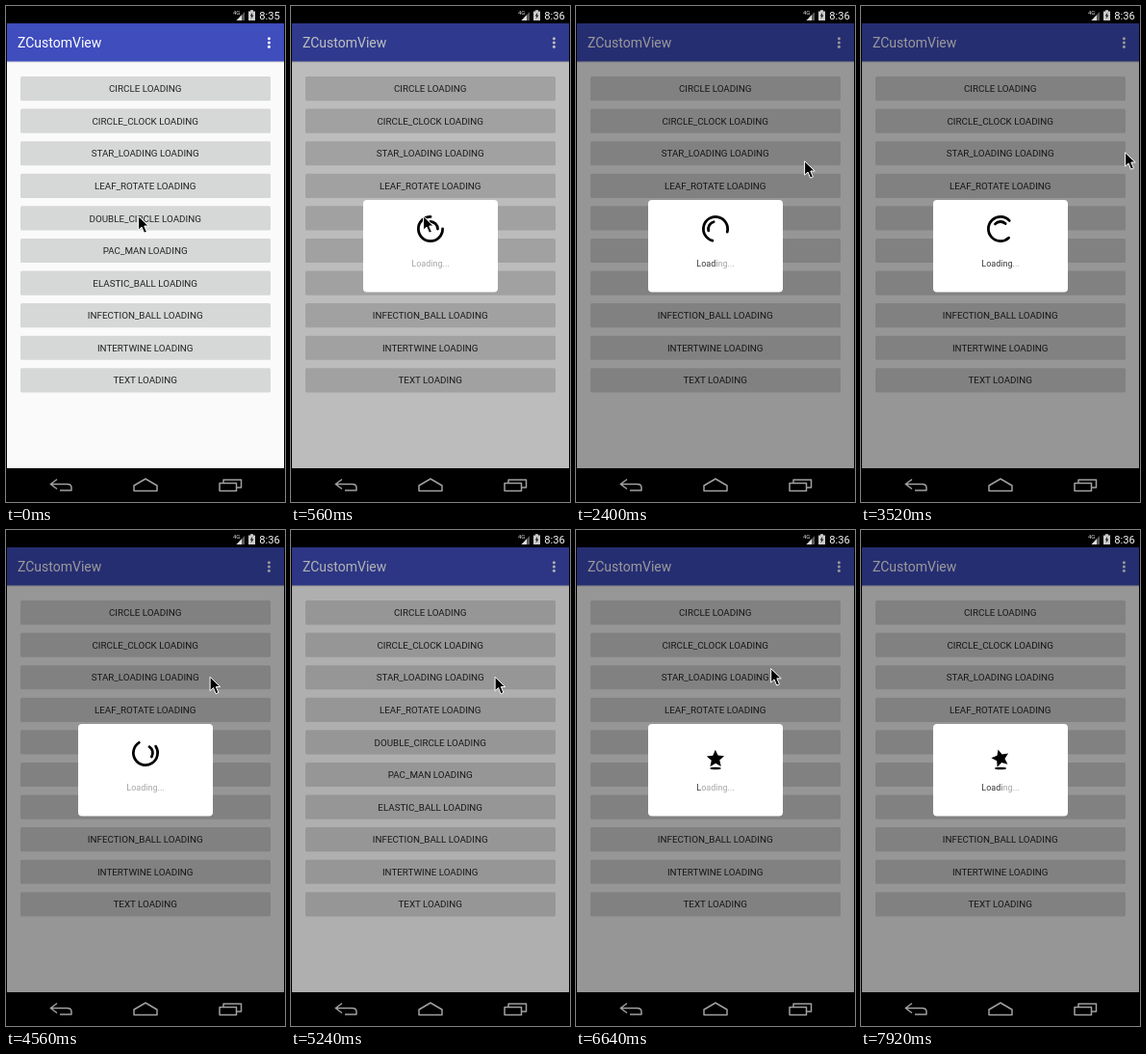
Recreate the animation shown at these times as an HTML page. Size 290 px wide and 514 px high, loop 8000 ms.

```html
<!DOCTYPE html>
<html lang="en">
<head>
<meta charset="utf-8">
<title>Loading dialogs</title>
<style>
  html, body { margin: 0; width: 100%; height: 100%; overflow: hidden; background: #000; }
  svg { display: block; width: 290px; height: 514px; }
  text { font-family: Roboto, "Noto Sans", sans-serif; }
  .label { font-size: 9.8px; fill: #222; text-anchor: middle; }
  .nav { fill: none; stroke: #a0a0a0; stroke-width: 1.5; stroke-linejoin: round; }
  .ring { fill: none; stroke: #000; stroke-width: 2.8; stroke-linecap: round; }
</style>
</head>
<body>
<svg viewBox="0 0 290 514">
  <rect width="290" height="514"/>
  <rect x="1" y="18" width="288" height="461" fill="#fafafa"/>
  <rect x="1" y="18" width="288" height="39.5" fill="#3f4dbd"/>
  <rect x="1" y="57.5" width="288" height="1" opacity=".13"/>
  <text x="12" y="43" font-size="14" fill="#fff">ZCustomView</text>
  <g fill="#fff">
    <circle cx="273.4" cy="33.8" r="1.5"/>
    <circle cx="273.4" cy="38" r="1.5"/>
    <circle cx="273.4" cy="42.2" r="1.5"/>
  </g>
  <g id="buttons"></g>

  <text x="236" y="9" font-size="6" fill="#ddd">4G</text>
  <path d="M239.5 15H248V6Z" fill="#5a5a5a"/>
  <path d="M239.5 15H245V9.2Z" fill="#ddd"/>
  <path d="M252 5.5h2v-1.3h3v1.3h2V15h-7Z" fill="#ccc"/>
  <path d="M256.3 6.5L253.7 10.4H255.2L254.6 13.6L257.5 9.5H255.8Z" fill="#222"/>
  <text id="clock" x="263.3" y="14" font-size="11.2" fill="#f4f4f4"></text>

  <path class="nav" d="M53 490.5L46.3 495.5L53 500.5M46.5 495.5H63.5Q68 495.5 68 499V502H56"/>
  <path class="nav" d="M145 490L133 497V502.5H157V497Z"/>
  <path class="nav" d="M222 494.5H239.5V502.5H222ZM226 494V491H244.5V499H240"/>

  <rect id="dim" x="1" y="18" width="288" height="461"/>
  <g id="dialog">
    <rect x="75" y="201" width="140" height="95.5" rx="4" fill="#fff"/>
    <g id="rings">
      <path id="outer" class="ring"/>
      <path id="inner" class="ring"/>
    </g>
    <g id="jump">
      <ellipse id="shadow" cx="145" cy="247" ry="1.3"/>
      <path id="star"/>
    </g>
    <text id="caption" x="145" y="270" font-size="9" text-anchor="middle"></text>
  </g>
  <path id="cursor" d="M.6 .8V15.2L4 12L6.6 18.2L9.4 17L6.8 11H11.2Z" fill="#000" stroke="#fff" stroke-width="1"/>
</svg>
<script>
const NS = "http://www.w3.org/2000/svg";
const LOOP = 8000, STEP = 40, SPIN = 1333, TYPING = 3740;
const CX = 145, CY = 231;
const $ = id => document.getElementById(id);

function add(parent, tag, attrs, text = "") {
  const el = document.createElementNS(NS, tag);
  for (const k in attrs) el.setAttribute(k, attrs[k]);
  el.textContent = text;
  return parent.appendChild(el);
}

["CIRCLE", "CIRCLE_CLOCK", "STAR_LOADING", "LEAF_ROTATE", "DOUBLE_CIRCLE",
 "PAC_MAN", "ELASTIC_BALL", "INFECTION_BALL", "INTERTWINE", "TEXT"].forEach((name, i) => {
  const y = 85.6 + i * 33.58;
  add($("buttons"), "rect", { x: 15, y: y - 12.6, width: 260, height: 25.2, rx: 1.5, fill: "#d6d7d7" });
  add($("buttons"), "text", { class: "label", x: 144.7, y: y + 3.6 }, name + " LOADING");
});

const letters = [..."Loading..."].map(c => add($("caption"), "tspan", {}, c));

const clamp = v => Math.min(1, Math.max(0, v));
const polar = (r, deg) => {
  const a = deg * Math.PI / 180;
  return `${(CX + r * Math.cos(a)).toFixed(2)} ${(CY + r * Math.sin(a)).toFixed(2)}`;
};
const arc = (r, from, sweep) =>
  `M${polar(r, from)}A${r} ${r} 0 ${sweep > 180 ? 1 : 0} 1 ${polar(r, from + sweep)}`;

$("star").setAttribute("d", "M" + Array.from({ length: 10 },
  (_, i) => polar(i % 2 ? 4.5 : 9.6, i * 36 - 90)).join("L") + "Z");

// Linear interpolation through [time, ...values] rows
function track(rows, t) {
  const i = rows.findIndex(row => row[0] > t);
  if (i === 0) return rows[0].slice(1);
  if (i < 0) return rows[rows.length - 1].slice(1);
  const a = rows[i - 1], b = rows[i], k = (t - a[0]) / (b[0] - a[0]);
  return a.slice(1).map((v, j) => v + (b[j + 1] - v) * k);
}

const DIM = [[360, 0], [680, .4], [5200, .4], [5360, 0], [5820, 0], [6140, .4]];
const DIALOG = [[300, 0], [440, 1], [5080, 1], [5160, 0], [5740, 0], [5880, 1]];
const POINTER = [
  [0, 137, 217], [1800, 137, 217], [2400, 237, 160], [2640, 277, 150], [3480, 276, 150],
  [3600, 270, 153], [4320, 216, 153], [4560, 211.5, 151.5], [6600, 211.5, 151.5], [7400, 22, -22]
];

function draw(t) {
  const second = t >= 5400;
  $("clock").textContent = t < 480 ? "8:35" : "8:36";
  $("dim").setAttribute("opacity", track(DIM, t)[0]);
  $("dialog").setAttribute("opacity", track(DIALOG, t)[0]);
  const [x, y] = track(POINTER, t);
  $("cursor").setAttribute("transform", `translate(${x} ${y})`);

  const phase = Math.max(0, t - (second ? 6110 : 680)) / SPIN % 1;
  const turn = phase * 360;
  $("rings").setAttribute("visibility", second ? "hidden" : "inherit");
  $("jump").setAttribute("visibility", second ? "inherit" : "hidden");
  $("outer").setAttribute("d", arc(12.6, turn, 270));
  $("inner").setAttribute("d", arc(7.5, 270 - turn, 90));

  const drop = 3.5 * (1 - Math.cos(phase * 2 * Math.PI));
  $("star").setAttribute("transform", `translate(0 ${drop}) rotate(${turn} ${CX} ${CY})`);
  $("shadow").setAttribute("rx", 9.6 - drop * .6);

  const typed = Math.max(0, t - (second ? 6240 : 800)) / TYPING % 1 * letters.length;
  letters.forEach((el, i) => {
    const v = Math.round(166 - 110 * clamp(typed - i));
    el.setAttribute("fill", `rgb(${v},${v},${v})`);
  });
}

const start = performance.now();
function tick() {
  const t = (performance.now() - start) % LOOP;
  draw(Math.floor(t / STEP) * STEP);
  requestAnimationFrame(tick);
}
tick();
</script>
</body>
</html>
```
